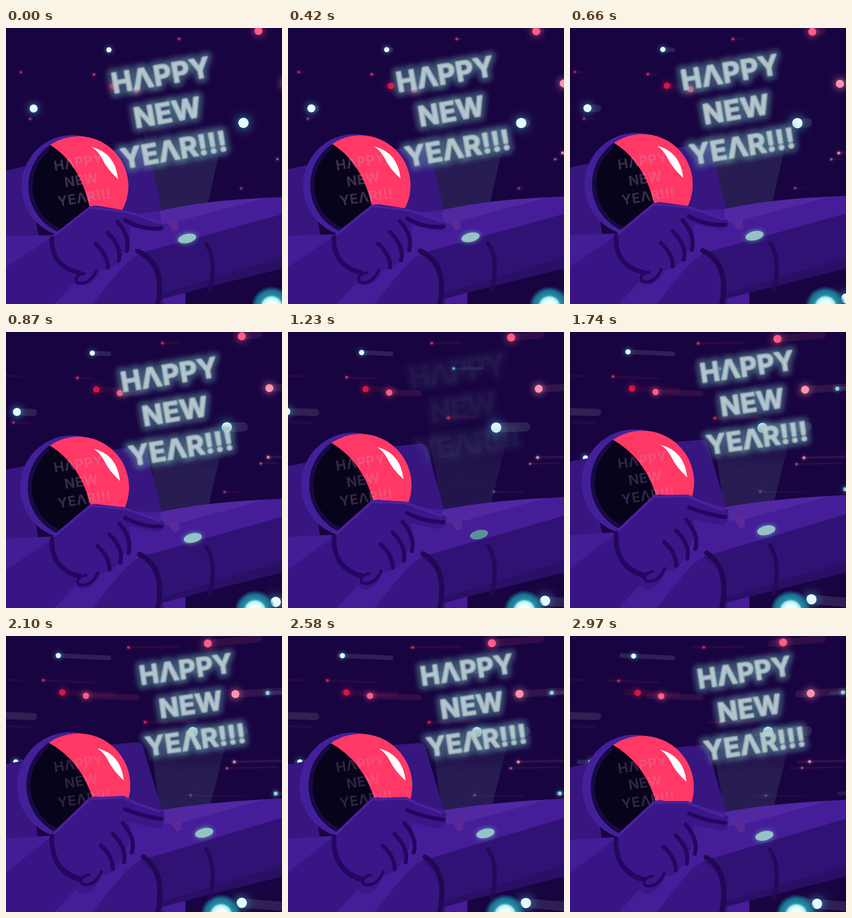
Animation of 480x480 px, one loop 3 s. Source, as an HTML page with a canvas:

```html
<!DOCTYPE html>
<html lang="en">
<head>
<meta charset="utf-8">
<style>
html, body { margin: 0; width: 100%; height: 100%; overflow: hidden; background: #180440; }
canvas { display: block; width: 480px; height: 480px; }
</style>
</head>
<body>
<canvas id="stage" width="480" height="480"></canvas>
<script>
const ctx = document.getElementById('stage').getContext('2d');
const LOOP = 3000, STEP = 30, SWING = 2250, DRIFT = 89;
const WHITE = '#e4fbff', TEAL = '#58b9c2', PINK = '#ff5c86', RED = '#d41745';

// x, y, radius, colour, vertical drift
const stars = [
  [439, 5, 7, PINK, 8], [179, 38, 4.5, WHITE, -4], [48, 140, 7, WHITE, -3],
  [413, 165, 9, WHITE, 2], [487, 96, 7, '#ff93ad', 5], [186, 101, 5.5, RED, -3],
  [227, 107, 5.5, PINK, -3], [153, 81, 2.3, '#c52c5c', -4], [26, 77, 2.2, '#a92852', -3],
  [301, 19, 2.3, '#c52c5c', 1], [330, 148, 2.5, RED, 2], [339, 63, 2.3, TEAL, 1],
  [543, 95, 3.5, '#83d7d8', 4], [485, 217, 2.5, '#e88498', 2], [472, 228, 2, '#a55574', 2],
  [409, 279, 2, '#8c3e68', -2], [557, 270, 3.5, '#83d7d8', 4], [42, 158, 2.3, '#74405f', -2],
  [105, 219, 4.5, WHITE, 0], [498, 472, 9, WHITE, -8]
];

let q = 0; // 0 = start pose, 1 = far end of the swing
const mix = (a, b) => (a + (b - a) * q).toFixed(2);

function fill(color, path) {
  ctx.fillStyle = color;
  ctx.fill(new Path2D(path));
}

function line(color, width, path) {
  ctx.strokeStyle = color;
  ctx.lineWidth = width;
  ctx.stroke(new Path2D(path));
}

function disc(color, x, y, r) {
  ctx.fillStyle = color;
  ctx.beginPath();
  ctx.arc(x, y, r, 0, Math.PI * 2);
  ctx.fill();
}

function layer(draw) {
  ctx.save();
  draw();
  ctx.restore();
}

function greeting(method, x, y, angle, scale, gap) {
  layer(() => {
    ctx.translate(x, y);
    ctx.rotate(angle * Math.PI / 180);
    ctx.scale(scale, scale);
    ctx.font = '700 48px Inter, sans-serif';
    ctx.letterSpacing = '1px';
    ctx.textAlign = 'center';
    ['HΛPPY', 'NEW', 'YEΛR!!!'].forEach((word, i) => ctx[method](word, 0, 17 + (i - 1) * gap));
  });
}

function sky(reach) {
  ctx.fillStyle = '#180440';
  ctx.fillRect(0, 0, 480, 480);
  for (const [x, y, r, color, dy] of stars) {
    layer(() => {
      ctx.globalAlpha = 0.11;
      line(color, r * 1.8, `M${x} ${y}L${x - DRIFT * reach} ${y + dy * reach}`);
    });
    layer(() => {
      ctx.shadowColor = color === WHITE ? '#43c2d4' : color;
      ctx.shadowBlur = r * 2;
      disc(color, x - DRIFT * q, y + dy * q, r);
    });
  }
  const x = 462 - DRIFT * q, y = 485;
  const glow = ctx.createRadialGradient(x, y, 10, x, y, 36);
  glow.addColorStop(0, '#efffff');
  glow.addColorStop(0.25, '#b4eff2');
  glow.addColorStop(0.4, '#248fa8');
  glow.addColorStop(0.7, '#1b7191');
  glow.addColorStop(1, '#1b719100');
  disc(glow, x, y, 36);
}

function beam(on) {
  const light = ctx.createLinearGradient(0, 320, 0, 160);
  light.addColorStop(0, '#56658640');
  light.addColorStop(0.5, '#56658640');
  light.addColorStop(1, '#56658600');
  layer(() => {
    ctx.globalAlpha = on ? 1 : 0.7;
    fill(light, `M272 330L${mix(232, 246)} 150H${mix(385, 392)}L346 330Z`);
  });
}

function hologram(on) {
  const pose = [+mix(281, 322), +mix(147, 119), +mix(-10, -8), +mix(1, 0.94), 66];
  layer(() => {
    ctx.globalAlpha = on ? 0.5 : 0.08;
    ctx.filter = 'blur(4px)';
    ctx.lineWidth = 17;
    ctx.strokeStyle = '#5b919e';
    greeting('strokeText', ...pose);
  });
  layer(() => {
    ctx.globalAlpha = on ? 0.95 : 0.04;
    ctx.filter = 'blur(1px)';
    ctx.lineWidth = 2;
    ctx.fillStyle = ctx.strokeStyle = '#b9cdd2';
    greeting('strokeText', ...pose);
    greeting('fillText', ...pose);
  });
}

function helmet() {
  fill('#371680', `M0 ${mix(248, 222)}L35 ${mix(240, 216)}L60 380H0Z`);
  fill('#371680', `M165 ${mix(215, 190)}L${mix(230, 224)} ${mix(207, 185)}
    Q${mix(246, 237)} ${mix(206, 183)} ${mix(250, 240)} ${mix(223, 199)}L272 ${mix(322, 304)}V330H150Z`);
  const r = +mix(87, 90.5), cy = +mix(275, 259.5);
  disc('#43209a', +mix(116, 112), cy, r + 2);
  layer(() => {
    ctx.beginPath();
    ctx.arc(126, cy, r, 0, Math.PI * 2);
    ctx.clip();
    disc('#ff3866', 126, cy, r);
    fill('#07031b', `M20 150L${mix(73, 72)} ${mix(201, 184)}
      Q${mix(131, 133)} ${mix(235, 217)} ${mix(147, 153)} ${mix(320, 290)}V390H20Z`);
    ctx.strokeStyle = '#170a46';
    ctx.lineWidth = 14;
    ctx.beginPath();
    ctx.arc(126, cy, r, 2, 4);
    ctx.stroke();
    layer(() => {
      ctx.globalAlpha = +mix(0.28, 0.2);
      ctx.fillStyle = '#c6a6c1';
      greeting('fillText', 131, +mix(264, 252), -9, 0.5, 62);
    });
    layer(() => {
      ctx.translate(10 * q, -12 * q);
      fill('#ffffff', 'M149 207Q190 217 195 263Q176 246 167 227Q160 214 149 207Z');
    });
  });
}

function body(on) {
  // torso and far forearm
  fill('#421d96', `M0 ${mix(362, 352)}L90 ${mix(360, 346)}L180 340L250 480H0Z`);
  fill('#371584', `M0 ${mix(416, 411)}L${mix(80, 78)} ${mix(364, 350)}L130 430L85 480H0Z`);

  // near arm
  const top = mix(318, 303);
  fill('#451d98', `M85 480L190 400L205 ${mix(320, 296)}L225 ${mix(324, 289)}L268 ${top}
    Q350 ${mix(299, 289)} 480 ${mix(294, 282)}V418L312 460V480Z`);
  fill('#5127a2', `M268 ${top}Q350 ${mix(299, 289)} 450 ${mix(296, 284)}
    L300 ${mix(336, 326)}L270 ${mix(342, 326)}Z`);
  fill('#381582', `M150 480L195 425Q220 ${mix(395, 392)} 250 ${mix(386, 384)}L275 480Z`);
  fill('#2f1273', `M${mix(232, 242)} ${mix(392, 388)}L480 ${mix(324, 316)}V418L312 460L270 470Q278 420 232 392Z`);
  fill('#290f65', 'M268 463L360 435L480 399V418L312 460L266 473Z');
  line('#210856', 9, `M${mix(229, 239)} ${mix(388, 384)}Q278 410 264 480`);
  line('#230958', 7, `M348 ${mix(375, 371)}Q367 400 355 455`);

  // the hand stretches upward while its fingers slide along the arm
  layer(() => {
    ctx.translate(0, 440);
    ctx.scale(1, 1 + 0.23 * q);
    ctx.translate(0, -440);
    fill('#3a1689', `M78 364L143 313Q151 307 165 310L205 ${mix(317, 308)}L225 ${mix(322, 316)}
      L275 ${mix(342, 330)}Q278 353 262 354L215 345Q218 378 200 398Q190 419 165 421
      Q154 447 132 447Q116 442 124 428Q76 414 78 364Z`);
    line('#4a229d', 4, `M85 360L146 312L204 ${mix(319, 310)}L225 ${mix(324, 318)}L266 ${mix(339, 330)}`);
    line('#230760', 8, 'M80 366Q78 414 128 426');
  });
  line('#230760', 7, `M207 ${mix(334, 301)}Q237 ${mix(352, 313)} 270 ${mix(348, 318)}`);
  layer(() => {
    ctx.translate(9 * q, -12 * q);
    line('#230760', 7, 'M194 337Q217 363 210 388');
    line('#230760', 7, 'M177 356Q202 381 196 405');
    line('#230760', 7, 'M156 376Q177 395 177 417');
    line('#230760', 5, 'M136 427Q118 430 123 443Q145 449 157 422');
  });
  fill('#5a2898', `M${mix(278, 284)} ${mix(336, 322)}l20 -3l2 17l-9 4Z`);

  layer(() => {
    ctx.translate(+mix(315, 345), +mix(366, 342));
    ctx.rotate(-0.22);
    ctx.scale(1, 0.5);
    ctx.shadowColor = '#67a9b5';
    ctx.shadowBlur = on ? 8 : 0;
    disc(on ? '#95c3c5' : '#5b8f9c', 0, 0, 16);
  });
}

function draw(now) {
  const t = Math.floor(now % LOOP / STEP) * STEP;
  const ease = time => (1 - Math.cos(Math.PI * time / SWING)) / 2;
  const on = t < 1200 || t >= 1290;
  q = ease(t);
  ctx.lineCap = ctx.lineJoin = 'round';
  sky(ease(Math.min(t, SWING)));
  beam(on);
  helmet();
  hologram(on);
  body(on);
}

const start = performance.now();
function tick() {
  draw(performance.now() - start);
  requestAnimationFrame(tick);
}
tick();
</script>
</body>
</html>
```
